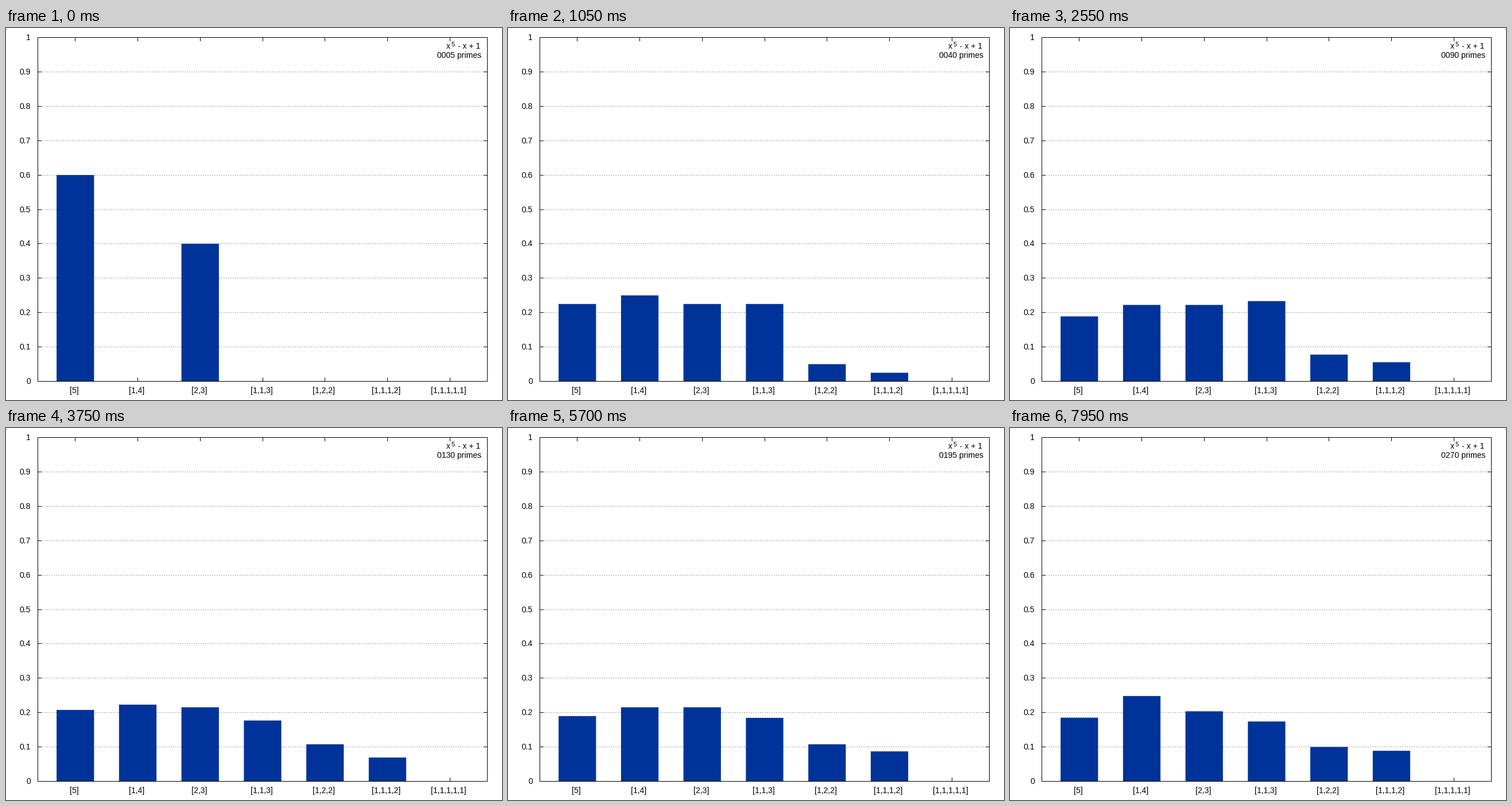
Animation of 864x648 px, one loop 8000 ms. Source, as a matplotlib script:

```python
import matplotlib.pyplot as plt
import numpy as np
from matplotlib.animation import FuncAnimation
from matplotlib.patches import Rectangle

WIDTH, HEIGHT, DPI = 864, 648, 96
LEFT, RIGHT, TOP, BOTTOM = 55, 838, 16, 615
TICK = 7
FRAME_MS, STEP_MS, LOOP_MS = 50, 150, 8000
PRIMES_PER_STEP = 5
STEPS = -(-LOOP_MS // STEP_MS)
DISCRIMINANT = 2869  # of x^5 - x + 1, equal to 19 * 151
LABELS = ["[5]", "[1,4]", "[2,3]", "[1,1,3]", "[1,2,2]", "[1,1,1,2]", "[1,1,1,1,1]"]

plt.rcParams["font.family"] = "Liberation Sans"
plt.rcParams["font.size"] = 10.5


def unramified_primes(count):
    found, n = [], 2
    while len(found) < count:
        if all(n % d for d in range(2, int(n**0.5) + 1)) and DISCRIMINANT % n:
            found.append(n)
        n += 1
    return found


def factor_type(p):
    """Index into LABELS of the factor degrees of x^5 - x + 1 modulo p."""
    x = np.arange(p, dtype=np.int64)
    roots = int(np.sum((x**5 - x + 1) % p == 0))
    even = p > 2 and pow(DISCRIMINANT, (p - 1) // 2, p) == 1
    if roots == 0:
        return 0 if even else 2
    if roots == 1:
        return 4 if even else 1
    return {2: 3, 3: 5, 5: 6}[roots]


types = [factor_type(p) for p in unramified_primes(STEPS * PRIMES_PER_STEP)]


# Positions on the stage, measured to the middle of the one-pixel lines.
def x_stage(value):
    return LEFT + 0.5 + (value + 0.6) * (RIGHT - LEFT) / 7.2


def y_stage(value):
    return BOTTOM + 0.5 - value * (BOTTOM - TOP)


fig = plt.figure(figsize=(WIDTH / DPI, HEIGHT / DPI), dpi=DPI, facecolor="white")
ax = fig.add_axes([0, 0, 1, 1])
ax.set_xlim(0, WIDTH)
ax.set_ylim(HEIGHT, 0)
ax.axis("off")


def hline(y, x0, x1, color="black", style="-", z=2):
    ax.hlines(y + 0.5, x0, x1, colors=color, linestyles=[style], lw=0.75,
              zorder=z, snap=False)


def vline(x, y0, y1, z=2):
    ax.vlines(x + 0.5, y0, y1, colors="black", lw=0.75, zorder=z, snap=False)


def label(x, y, text, ha="left", **kw):
    return ax.text(x, y, text, ha=ha, va="baseline", color="black", **kw)


for i in range(11):
    y = int(y_stage(i / 10))
    if 0 < i < 10:
        hline(y, LEFT, RIGHT, "#a0a0a0", (0, (2, 2)), z=1)
        hline(y, LEFT, LEFT + TICK)
        hline(y, RIGHT + 1 - TICK, RIGHT + 1)
    label(43, y + 5, f"{i / 10:g}", ha="right")

bars = []
for i, name in enumerate(LABELS):
    x = int(x_stage(i))
    vline(x, TOP, TOP + TICK)
    vline(x, BOTTOM + 1 - TICK, BOTTOM + 1)
    label(x_stage(i) - 2, 636, name, ha="center")
    x0, x1 = x_stage(i - 0.3), x_stage(i + 0.3)
    bar = Rectangle((x0, BOTTOM), x1 - x0, 0, fc="#003399", lw=0, zorder=3, snap=False)
    bars.append(ax.add_patch(bar))

for y in (TOP, BOTTOM):
    hline(y, LEFT, RIGHT + 1, z=4)
for x in (LEFT, RIGHT):
    vline(x, TOP, BOTTOM + 1, z=4)

label(767, 36, "x")
label(776, 32, "5", fontsize=8.4)
label(787, 36, "- x + 1")
counter = label(751, 52, "")


def update(frame):
    total = PRIMES_PER_STEP * (frame * FRAME_MS // STEP_MS + 1)
    counts = np.bincount(types[:total], minlength=len(LABELS))
    for bar, count in zip(bars, counts):
        top = y_stage(count / total)
        bar.set_y(top)
        bar.set_height(y_stage(0) - top)
    counter.set_text(f"{total:04d} primes")
    return [*bars, counter]


anim = FuncAnimation(fig, update, frames=LOOP_MS // FRAME_MS, interval=FRAME_MS,
                     repeat=True, repeat_delay=0)
plt.show()
```
